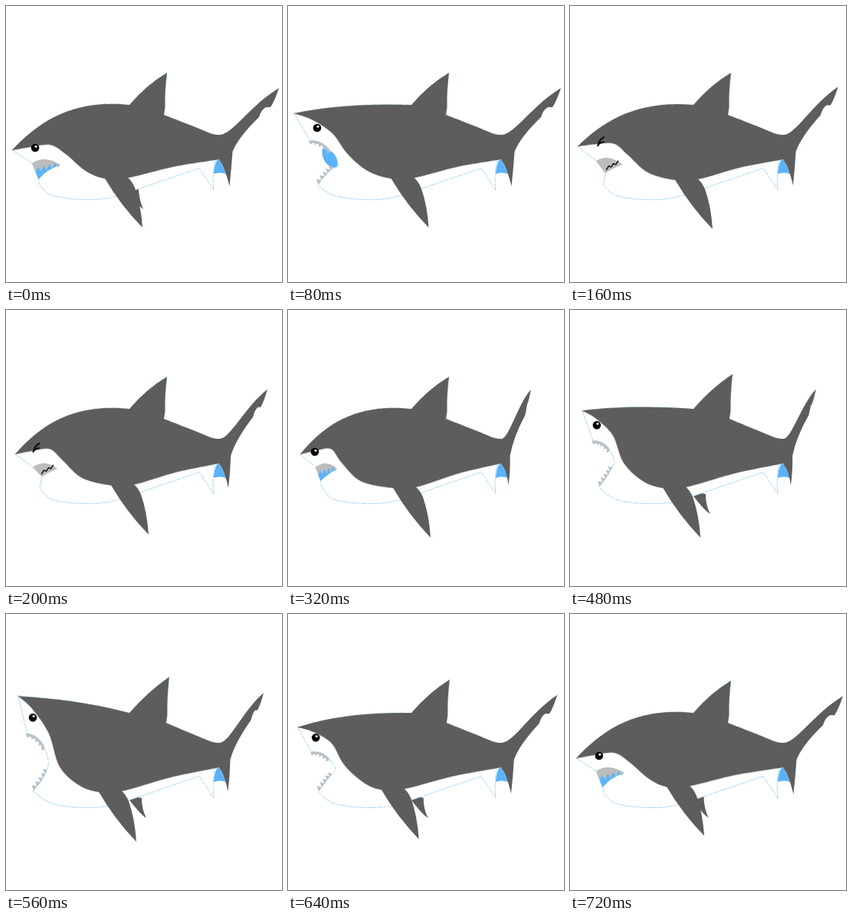
An HTML page for the animation above (760 ms loop, 360 px wide and 360 px high).

```html
<!DOCTYPE html>
<html lang="en">
<head>
<meta charset="utf-8">
<title>Shark</title>
<style>
html, body { margin: 0; width: 100%; height: 100%; overflow: hidden; background: #fff; }
svg { display: block; width: 100%; height: 100%; }
.skin { fill: #5d5d5d; }
.sea { fill: #59b3fa; }
</style>
</head>
<body>
<svg viewBox="0 0 360 360" fill="none" stroke-linecap="round" stroke-linejoin="round">
  <path id="farFin" class="skin"/>
  <path id="belly" fill="#fff" stroke="#62b8f0" stroke-width=".7" stroke-dasharray="6 1.5 3 2" stroke-opacity=".8"/>
  <path class="sea" d="M278,199 Q272,202 271,219 Q279,216 287,219 Z"/>
  <g id="shut">
    <path id="palate" fill="#bcbcbc"/>
    <path id="spikes" class="sea"/>
    <path id="wave" stroke="#111" stroke-width="1.5"/>
  </g>
  <g id="open">
    <path id="throat" class="sea"/>
    <path id="gum" stroke="#c3c8cc" stroke-width="3.6"/>
    <path id="teeth" fill="#b5bfc7"/>
  </g>
  <path id="rim" stroke="#c9c4c4" stroke-width="1.4"/>
  <path id="body" class="skin"/>
  <path id="fringe" stroke="#6fb4dc" stroke-width=".7" stroke-dasharray="5 6 2 4" stroke-opacity=".75"/>
  <path id="fin" class="skin"/>
  <g id="eye"><circle r="5.3" fill="#050505"/><circle cx="1" cy="-1.8" r="1.5" fill="#fff"/></g>
  <path id="squint" stroke="#0a0a0a" stroke-width="2"/>
</svg>
<script>
const LOOP = 760, STEP = 40;

const el = {};
document.querySelectorAll("[id]").forEach(n => el[n.id] = n);
const draw = (id, d) => el[id].setAttribute("d", d);
const show = (id, on) => el[id].setAttribute("visibility", on ? "inherit" : "hidden");

const pt = p => p[0].toFixed(2) + "," + p[1].toFixed(2) + " ";
const add = (p, x, y) => [p[0] + x, p[1] + y];
const mix = (a, b, k) => [a[0] + (b[0] - a[0]) * k, a[1] + (b[1] - a[1]) * k];
const bend = (a, c, b, k) => mix(mix(a, c, k), mix(c, b, k), k);
const move = p => "M" + pt(p);
const line = pts => pts.map(p => "L" + pt(p)).join("");
const quad = (c, p) => "Q" + pt(c) + pt(p);
const cubic = (a, b, p) => "C" + pt(a) + pt(b) + pt(p);

// smooth run through points, continuing from the first
function curve(p) {
  let d = "";
  for (let i = 0; i < p.length - 1; i++) {
    const a = p[i], b = p[i + 1], before = p[i - 1] || a, after = p[i + 2] || b;
    d += cubic(add(a, (b[0] - before[0]) / 6, (b[1] - before[1]) / 6),
      add(b, (a[0] - after[0]) / 6, (a[1] - after[1]) / 6), b);
  }
  return d;
}

function ramp(from, to, t) {
  const u = Math.min(1, Math.max(0, (t - from) / (to - from)));
  return u * u * (3 - 2 * u);
}
const pulse = (t, a, b, c, d) => ramp(a, b, t) - ramp(c, d, t);

// a row of triangles along a bent jaw line
function toothRow(a, c, b, from, to, dx, dy) {
  const n = 5, w = (to - from) / n;
  let d = "";
  for (let i = 0; i < n; i++) {
    const k = from + w * i;
    d += move(bend(a, c, b, k)) +
      line([add(bend(a, c, b, k + w / 2), dx, dy), bend(a, c, b, k + w)]) + "Z";
  }
  return d;
}

function drawMouth(nose, gape, pull, t, wince) {
  const both = gape * pull;
  const up = [34 - 5 * gape + 2 * pull, 205 - 29 * gape];
  const upBend = [50, 194 - 20 * gape];
  const corner = [71 - 5 * gape - 7 * pull, 207 - 8 * both];
  const lowBend = [53, 213];
  const low = [44 - 5.5 * gape, 234 - 3 * pull];
  const base = wince ? add(low, 3, -15) : add(low, -1.5, -8);
  const shut = gape < .55;

  const jaws = shut
    ? line([up, base, low])
    : line([up]) + quad(upBend, corner) + quad(lowBend, low);
  draw("belly", move(nose) + jaws +
    curve([low, [60, 247], [100, 252.5], [140, 249], [195, 231], [252, 211.5]]) +
    quad([259, 222], [271, 240]) + quad([269, 222], [272, 203]));

  show("shut", shut);
  show("open", !shut);
  show("spikes", shut && !wince);
  show("wave", shut && wince);
  show("throat", !shut && t < 160);

  draw("palate", move(up) + quad(upBend, corner) + quad(lowBend, base) + "Z");
  const left = mix(up, base, .5), zig = [], wave = [];
  for (let i = 0; i < 9; i++) zig.push(add(mix(left, corner, i / 9), 0, i % 2 ? -4.5 : 2.5));
  for (let i = 0; i < 6; i++) wave.push(add(corner, -21 + 3 * i, 5 - 1.6 * i + (i % 2 ? -1.5 : 1.5)));
  draw("spikes", move(left) + line(zig) + line([corner]) + quad(lowBend, base) + "Z");
  draw("wave", move(wave[0]) + line(wave));

  draw("teeth", toothRow(up, upBend, corner, 0, .7, -3, 5) +
    toothRow(corner, lowBend, low, .25, .97, -4.5, -4));
  const edge = [0, .2, .4, .6].map(k => add(bend(up, upBend, corner, k), 0, 1));
  draw("gum", move(edge[0]) + curve(edge));
  const a = add(corner, -21, -21), b = add(corner, -2, 3);
  draw("throat", move(a) + cubic(add(a, 13, 0), add(b, 3, -12), b) +
    cubic(add(b, -11, 4), add(a, -3, 13), a) + "Z");
}

function render(t) {
  // jaw opening, body drawn back, tail swing, fin sweep
  const gape = pulse(t, 0, 80, 80, 180) + 1.69 * pulse(t, 340, 560, 560, 720);
  const pull = pulse(t, 80, 320, 560, 740);
  const swing = pulse(t, 100, 340, 420, 700);
  const sweep = pulse(t, -160, 160, 340, 490) + ramp(600, 920, t);
  const wince = t >= 160 && t <= 240;
  const both = gape * pull;

  const nose = [8 + 8 * pull, 188 - 48 * gape];
  const dorsal = [210 + 1.7 * both, 87 - 3 * both];
  const heel = [dorsal[0] - 4, 142], stem = [279, 168], root = [278, 200];
  const rootA = [121 + 16 * sweep, 225 + 7 * pull];
  const rootB = add(rootA, 30, -1);
  const finTip = [170 + 16 * sweep, 289 + 8 * pull];
  const cheek = [
    [31 + 3 * pull, 184 - 36 * gape],
    [58 - 2 * pull, 181 - 15 * gape],
    [78 - 8 * pull, 193 + 6 * pull],
    [104 - 9 * pull, 215 + 8 * pull]
  ];

  drawMouth(nose, gape, pull, t, wince);

  const top = move(nose) +
    cubic([43 + 8 * gape + 4 * pull, 150 - 12 * gape - 7 * gape * gape],
      [88 + 12 * gape, 121 + 20 * gape - 14 * gape * gape], [161, 129]) +
    quad([183, 103], dorsal) + quad([dorsal[0] - 3, 112], add(heel, 1.5, -10)) + line([heel]) +
    curve([heel, [242, 156], [268, 166.5], stem]);

  const k = 1 - swing;
  const tip = [356 - 40 * swing, 107 - 3 * swing - 10 * swing * k];
  const notch = add(tip, -5 - 6 * k, 20 + 5 * k);
  const lobe = [287.5 + 4 * k, 228 + 7 * k];
  const tail = cubic([288 + 8 * k, 167], [300 + 18 * k, 122 + 8 * k], tip) +
    quad(add(notch, 3 + 2 * k, -7), notch) + line([add(notch, -6 * k, 0)]) +
    quad(add(notch, -12 * k, 3), add(notch, -13 * k - 2, 13)) +
    quad([294 + 9 * k, 165 + 6 * k], [289.5 + 6 * k, 190]) +
    quad([290 + 4 * k, 212], lobe) + quad([286, 212], root);

  const edge = add(mix(rootB, root, .5), 0, -2.5);
  const under = curve([root, edge, rootB, rootA, ...cheek.reverse(), nose]);
  draw("rim", move(root) + under);
  draw("body", top + tail + under + "Z");
  draw("fringe", top);

  draw("fin", move(rootA) + quad(add(mix(rootA, finTip, .5), -4, 3), finTip) +
    quad(add(finTip, -2, -30), add(rootB, 9, 13)) + quad(add(rootB, 5, 4), rootB) +
    line([add(rootB, -8, -6)]) + "Z");
  const farRoot = [177 - 8 * sweep, 240 - 7 * sweep];
  const farTip = [183 - 8 * sweep, 266 - 11 * sweep ** 3];
  draw("farFin", move(add(farRoot, -18, -3)) + line([farRoot]) +
    quad(add(farRoot, 0, 15), farTip) + quad(add(farTip, -7, -4), add(farRoot, -15, 4)) + "Z");

  const eye = [38 - 3 * pull, 185 - 26 * gape - 3.5 * both];
  show("eye", !wince);
  show("squint", wince);
  el.eye.setAttribute("transform", "translate(" + pt(eye) + ")");
  draw("squint", move(add(eye, 7, -11)) + quad(add(eye, 1, -8), add(eye, -1, 0)) +
    quad(add(eye, 1, -4), add(eye, 6.5, -5)));
}

const start = performance.now();
function tick() {
  const t = (performance.now() - start) % LOOP;
  render(Math.floor(t / STEP) * STEP);
  requestAnimationFrame(tick);
}
tick();
</script>
</body>
</html>
```
